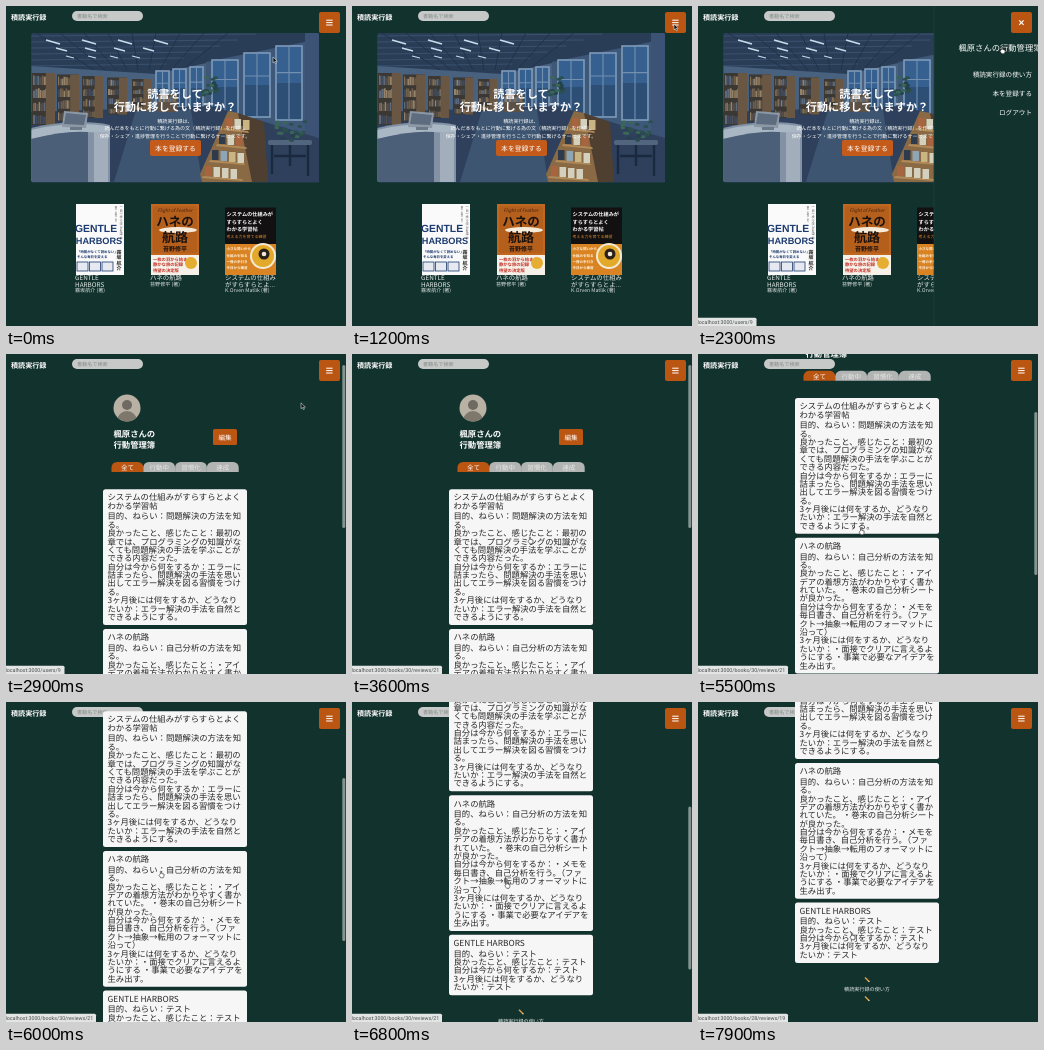
An HTML page for the animation above (8000 ms loop, 340 px wide and 320 px high).

```html
<!DOCTYPE html>
<html lang="ja">
<head>
<meta charset="utf-8">
<style>
  html, body { margin: 0; width: 100%; height: 100%; overflow: hidden; background: #12322d; }
  svg { display: block; font-family: "Noto Sans CJK JP", "Noto Sans CJK", sans-serif; text-rendering: geometricPrecision; }
  .latin { font-family: Roboto, "Open Sans", sans-serif; }
</style>
</head>
<body>
<svg id="stage" width="340" height="320" viewBox="0 0 340 320"></svg>
<script>
const BG = '#12322d', ORANGE = '#bb5512', INK = '#262626', NAVY = '#1d3b70';
const SERVICE = '積読実行録', USER = '楓原さんの';
const BOOKS = [
  { title: 'GENTLE HARBORS', lines: ['GENTLE', 'HARBORS'], by: '霧坂航介' },
  { title: 'ハネの航路', lines: ['ハネの航路'], by: '苔野修平' },
  { lines: ['システムの仕組み', 'がすらすらとよ...'], by: 'K.Orven Matlik' }
];

let seed = 7;
const rnd = () => (seed = seed * 16807 % 2147483647) / 2147483647;
const pick = list => list[Math.floor(rnd() * list.length)];

// y is the middle of the line
const text = (x, y, size, str, fill = '#fff', more = '') =>
  `<text x="${x}" y="${y + size * .38}" font-size="${size}" fill="${fill}" ${more}>${str}</text>`;
const MID = ' text-anchor="middle"', END = ' text-anchor="end"', BOLD = ' font-weight="700"';
const rect = (x, y, w, h, fill, r = 0, more = '') =>
  `<rect x="${x}" y="${y}" width="${w}" height="${h}" rx="${r}" fill="${fill}" ${more}/>`;
const oval = (x, y, rx, ry, fill, more = '') => `<ellipse cx="${x}" cy="${y}" rx="${rx}" ry="${ry}" fill="${fill}" ${more}/>`;
const poly = (points, fill, more = '') => `<polygon points="${points}" fill="${fill}" ${more}/>`;
const line = (d, stroke, w = 1, more = '') => `<path d="${d}" fill="none" stroke="${stroke}" stroke-width="${w}" ${more}/>`;

function bookRow(x, y, w, h, colors) {
  let out = '';
  for (let i = 0; i < w;) {
    const bw = Math.min(w - i, 1 + rnd() * 1.4), bh = h * (.7 + rnd() * .3);
    out += rect(x + i, y + h - bh, bw, bh, pick(colors));
    i += bw + .2;
  }
  return out;
}

function bookcase(x, y, w, h) {
  const spines = ['#6d5d4b', '#857055', '#55504b', '#5d6a7c', '#3f4a5c', '#94836a'];
  let out = rect(x, y, w, h, '#3b3732') + rect(x + w * .6, y, w * .4, h, '#6a5743');
  for (let r = 0; r < 4; r++) out += bookRow(x + 1, y + 2 + r * h / 4, w * .6 - 1, h / 4 - 3, spines);
  return out;
}

function plant(x, y, w, h) {
  let out = '';
  for (let i = 0; i < 22; i++) {
    out += oval(x + (rnd() - .5) * w, y + (rnd() - .5) * h, 2.5, 1.6, pick(['#2b4f4c', '#3a6658', '#23424a']));
  }
  return out;
}

function windowPane(x, y, w, h) {
  let out = rect(x, y, w, h, '#35608f') + rect(x, y + h * .5, w, h * .5, '#2d4f76');
  out += rect(x, y, w, h, 'none', 0, 'stroke="#7f9bba" stroke-width="1.6"');
  return out + line(`M${x + w / 2} ${y}v${h}M${x} ${y + h * .36}h${w}`, '#7390b1', 1.1);
}

function library() {
  let out = rect(25, 27, 289, 150, '#2d425e');
  // ceiling beams and lamps
  out += poly('25,27 313,27 313,34 205,58 150,68 25,62', '#2a3d57');
  for (let i = 0; i < 6; i++) out += line(`M25 ${30 + i * 6}L${250 - i * 18} ${28 + i * 6}`, '#3d5470', .9);
  for (let i = 0; i < 9; i++) out += line(`M${30 + i * 24} 27L${88 + i * 11} 64`, '#203148', .9);
  for (let r = 0; r < 3; r++) for (let i = 0; i < 4; i++) {
    const x = 40 + r * 10 + i * (36 - r * 7), y = 34 + r * 8;
    out += line(`M${x} ${y}l${14 - r * 3} ${4 - r}`, '#c8dcec', 1.7 - r * .3);
  }
  // back wall and windows
  out += poly('25,60 150,68 205,56 205,106 25,106', '#48617f');
  out += poly('200,56 313,33 313,134 200,110', '#3d5879');
  for (let i = 0; i < 3; i++) out += windowPane(150 + i * 17, 65 - i * 2, 13, 34 + i * 4);
  for (let i = 0; i < 3; i++) out += windowPane(206 + i * 32, 54 - i * 7, 26, 54 + i * 10);
  out += rect(299, 27, 14, 130, '#3c5375') + rect(299, 156, 14, 20, '#6c7b91');
  // floor
  out += poly('25,106 205,100 313,132 313,176 25,176', '#2e405b');
  out += poly('130,104 185,104 196,176 108,176', '#496381', 'opacity=".6"');
  // bookcases
  for (let i = 0; i < 5; i++) out += bookcase(26 + i * 25, 67 + i * 1.5, 23 - i, 52 - i * 5);
  out += rect(151, 88, 20, 18, '#5d5044') + bookRow(152, 90, 18, 6, ['#857055', '#5d6a7c', '#94836a']);
  out += plant(205, 80, 14, 18);
  // round counter
  out += `<path d="M25 122Q70 112 104 119V176H25Z" fill="#8292a4"/><path d="M25 124Q70 114 104 121V128Q70 122 25 133Z" fill="#a9b7c4"/>`;
  out += `<path d="M25 133Q60 124 82 126V176H25Z" fill="#4c5f78"/>` + rect(88, 126, 14, 50, '#a2aebb');
  out += poly('58,105 82,107 80,122 56,121', '#8c98a5') + poly('60,107 80,109 78,119 58,118', '#5d6c7e') + rect(64, 121, 12, 3, '#6b7888');
  // chairs and plant at the right
  out += rect(262, 134, 44, 5, '#51657f', 2) + line('M266 139V168M302 139V170M268 150H300M284 139V160', '#1b2940', 2.4);
  out += plant(283, 125, 32, 20);
  // magazine rack
  out += poly('222,105 232,107 262,176 196,176 194,168', '#8a6a45') + poly('232,107 258,116 262,176 246,176', '#4f3f31');
  for (let r = 0; r < 4; r++) {
    const y = 111 + r * 16, x = 218 - r * 7;
    out += poly(`${x},${y + 11} ${x + 24 + r * 5},${y + 14} ${x + 25 + r * 5},${y + 16} ${x - 1},${y + 13}`, '#b08a58');
    for (let i = 0; i < 3 + (r > 1); i++) out += rect(x + 2 + i * 8.5, y + 1 + i, 6.5, 10, pick(['#c9b583', '#8ea5b5', '#a8643f', '#d3d0bd', '#2d3b4c']), .4);
  }
  return `<g clip-path="url(#heroClip)">${out}</g>`;
}

function covers() {
  let a = rect(70, 198, 48, 71, '#fafafa');
  const sans = ' font-family="Liberation Sans, sans-serif"';
  a += text(90, 222, 10.4, 'GENTLE', NAVY, MID + BOLD + sans) + text(93, 235, 9.2, 'HARBORS', NAVY, MID + BOLD + sans);
  [...'一日一歩で学びを深め'].forEach((c, i) => a += text(115, 201 + i * 3.4, 3.2, c, '#444', MID));
  [...'静かに続ける力'].forEach((c, i) => a += text(110, 201 + i * 2.4, 2.3, c, '#444', MID));
  a += text(71, 246, 3.4, '「時間がなくて読めない」', NAVY, BOLD) + text(71, 251, 3.4, 'そんな毎日を変える', NAVY, BOLD);
  for (let i = 0; i < 3; i++) a += rect(71 + i * 12.5, 256, 11, 9, '#e6eaf0', 0, `stroke="${NAVY}" stroke-width=".8"`);
  [...BOOKS[0].by].forEach((c, i) => a += text(113, 246 + i * 5.5, 5, c, INK, MID + BOLD));

  let b = rect(145, 198, 48, 71, '#c0681f') + rect(147, 200, 44, 47, '#a4511a', 2, 'opacity=".4"');
  b += text(169, 204, 4.6, 'Flight of Feather', '#46230f', MID + ' font-style="italic"');
  b += oval(172, 224, 19, 3, '#f6ead8');
  b += text(169, 215, 12.5, 'ハネの', '#1b120d', MID + BOLD) + text(169, 231, 13, '航路', '#1b120d', MID + BOLD);
  b += text(169, 243, 6, BOOKS[1].by, '#1b120d', MID + BOLD);
  b += rect(145, 249, 48, 20, '#f5f1e8');
  ['一枚の羽から始まる', '静かな旅の記録', '待望の決定版'].forEach((s, i) => b += text(147, 253 + i * 5.7, 4.3, s, '#c52d23', BOLD));
  b += oval(185, 257, 6, 6, '#e5ae32');

  let c = rect(219, 201.5, 51, 67.5, '#121010');
  ['システムの仕組みが', 'すらすらとよく', 'わかる学習帖'].forEach((s, i) => c += text(220.5, 208.5 + i * 7.3, 5.2, s, '#fff', BOLD));
  c += text(220.5, 230.5, 4, '考える力を育てる練習', '#d58a35');
  c += rect(219, 238, 51, 31, '#d98322');
  c += oval(257, 250, 13, 13, '#f3ead6') + oval(257, 250, 11, 11, '#e3a92b') + oval(258, 248, 5.5, 5.5, '#2a211a') + oval(258, 248, 2.3, 2.3, '#f3ead6');
  ['小さな問いから', '仕組みを知る', '一冊の手引き', '今日から練習'].forEach((s, i) => c += text(220.5, 243 + i * 6.3, 3.5, s, '#fff4df', BOLD));
  return a + b + c;
}

function homePage() {
  let out = library();
  out += text(169, 88, 11.2, '読書をして', '#fff', MID + BOLD) + text(169, 101, 11.2, '行動に移していますか？', '#fff', MID + BOLD);
  [SERVICE + 'は、', `読んだ本をもとに行動に繋げる為の文（${SERVICE}）を作成し`, '保存・シェア・進捗管理を行うことで行動に繋げるサービスです。']
    .forEach((s, i) => out += text(169, 115 + i * 7.4, 5.05, s, '#fff', MID));
  out += rect(144, 134, 51, 16, '#c45b1b', 2) + text(169.5, 142, 6.8, '本を登録する', '#fff', MID);
  out += covers();
  BOOKS.forEach((book, i) => {
    const x = 69 + i * 75;
    book.lines.forEach((s, k) => out += text(x, 272 + k * 6.6, 6.4, s, '#e9eeec'));
    out += text(x, i === 1 ? 278 : 284, 5.1, book.by + ' (著)', '#dde4e1');
  });
  return out;
}

const LINE = 8.38;
function card(y, h, title, body) {
  let out = rect(97, y, 144, h, '#f6f6f6', 2.5);
  title.forEach((s, i) => out += text(101.5, y + 8 + i * LINE, 8.35, s, INK));
  const top = y + 18.6 + (title.length - 1) * LINE;
  body.forEach((s, i) => out += text(101.5, top + i * LINE, 8.35, s, INK));
  return out;
}

function notesPage() {
  let out = `<g clip-path="url(#faceClip)">${rect(107, 40, 28, 28, '#b8b1a4')}${oval(121, 51, 5, 5, '#6f6a61')}${oval(121, 67, 10, 10, '#7d776c')}</g>`;
  out += text(107.5, 80, 8.35, USER, '#fff', BOLD) + text(107.5, 91, 8.35, '行動管理簿', '#fff', BOLD);
  out += rect(207, 75, 24, 16, ORANGE, 1.5) + text(219, 83, 6.6, '編集', '#fff', MID);
  ['全て', '行動中', '習慣化', '達成'].forEach((s, i) => {
    const x = 105.5 + i * 31.8;
    out += `<path d="M${x} 118v-4.5a5.5 5.5 0 0 1 5.5-5.5h20.8a5.5 5.5 0 0 1 5.5 5.5v4.5z" fill="${i ? '#b1b4b2' : ORANGE}"/>`;
    out += text(x + 15.9, 113.3, 6.5, s, i ? '#e6e8e6' : '#fff', MID);
  });
  out += card(135.3, 135.7, ['システムの仕組みがすらすらとよく', 'わかる学習帖'], [
    '目的、ねらい：問題解決の方法を知', 'る。', '良かったこと、感じたこと：最初の',
    '章では、プログラミングの知識がな', 'くても問題解決の手法を学ぶことが', 'できる内容だった。',
    '自分は今から何をするか：エラーに', '詰まったら、問題解決の手法を思い', '出してエラー解決を図る習慣をつけ', 'る。',
    '3ヶ月後には何をするか、どうなり', 'たいか：エラー解決の手法を自然と', 'できるようにする。']);
  out += card(275, 135.7, [BOOKS[1].title], [
    '目的、ねらい：自己分析の方法を知', 'る。', '良かったこと、感じたこと：・アイ',
    'デアの着想方法がわかりやすく書か', 'れていた。 ・巻末の自己分析シート', 'が良かった。',
    '自分は今から何をするか：・メモを', '毎日書き、自己分析を行う。（ファ', 'クト→抽象→転用のフォーマットに', '沿って）',
    '3ヶ月後には何をするか、どうなり', 'たいか：・面接でクリアに言えるよ', 'うにする ・事業で必要なアイデアを', '生み出す。']);
  out += card(414.5, 60.5, [BOOKS[0].title], [
    '目的、ねらい：テスト', '良かったこと、感じたこと：テスト', '自分は今から何をするか：テスト',
    '3ヶ月後には何をするか、どうなり', 'たいか：テスト']);
  for (const y of [491.5, 510.5]) out += line(`M167 ${y - 2}L171 ${y + 2}`, '#e0a04a', 1.5) + line(`M170.6 ${y + 1.6}L171.4 ${y + 2.4}`, '#f0dcc0', 1.2);
  return out + text(169, 501, 5.1, SERVICE + 'の使い方', '#dfe6e3', MID);
}

function menuPanel() {
  return rect(236, 0, 106, 320, BG) + line('M236 0V320', '#1f3f3a', .8) +
    text(260.5, 42, 8.3, USER + '行動管理簿') +
    text(334, 68, 6.6, SERVICE + 'の使い方', '#fff', END) +
    text(334, 87, 6.6, '本を登録する', '#fff', END) +
    text(334, 106, 6.6, 'ログアウト', '#fff', END);
}

const stage = document.getElementById('stage');
stage.innerHTML = `
  <defs>
    <clipPath id="heroClip">${rect(25.5, 27, 287.5, 149.5, '#fff', 2)}</clipPath>
    <clipPath id="faceClip"><circle cx="121" cy="54" r="13.5"/></clipPath>
  </defs>
  ${rect(0, 0, 340, 320, BG)}
  ${text(5, 11, 7.1, SERVICE, '#fff', BOLD)}
  ${rect(66, 5, 71, 10, '#c6c9c8', 5)}${text(71, 10, 5.1, '書籍名で検索', '#868c8a')}
  <g id="home">${homePage()}</g>
  <g id="notes">${notesPage()}</g>
  <g id="menu">${menuPanel()}</g>
  ${rect(313, 6, 21, 21, ORANGE, 2)}
  ${line('M320.2 14.2h6.4M320.2 16.6h6.4M320.2 19h6.4', '#fff', 1, 'id="bars"')}
  ${line('M321.2 14.4l4.4 4.4M325.6 14.4l-4.4 4.4', '#fff', 1.2, 'id="cross"')}
  ${rect(336.3, 11, 3, 163, '#84948f', 1.5, 'id="thumb"')}
  <g id="status">${rect(-2, 311.7, 60, 10, '#e3e5e5', 1.5, 'id="statusBox"')}
    <text id="url" class="latin" x="-.5" y="317.8" font-size="5.3" fill="#4a4d4d"></text></g>
  <path id="arrow" d="M0 0V5.8L1.4 4.6L2.4 6.8L3.4 6.3L2.4 4.2H4.3Z" fill="#111" stroke="#fff" stroke-width=".5"/>
  <path id="hand" d="M1.4 3V.6a.6.6 0 0 1 1.2 0V2.4L5 3V5L4.2 6.8H1.8L0 4.2L.5 3.6Z" fill="#fff" stroke="#222" stroke-width=".6"/>`;

const el = id => document.getElementById(id);
const show = (id, on) => el(id).style.display = on ? '' : 'none';
const clamp = (v, lo = 0, hi = 1) => Math.min(hi, Math.max(lo, v));
const ease = p => p * p * (3 - 2 * p);
const move = (id, x, y) => el(id).setAttribute('transform', `translate(${x} ${y})`);

// time, x, y
const POINTER = [[0, 267, 51], [400, 267, 51], [1100, 322, 18], [1500, 322, 18], [2200, 302, 41],
  [2800, 302, 41], [3500, 176, 183], [4900, 176, 183], [5900, 153, 169], [6600, 153, 170], [7400, 152, 231], [8000, 152, 231]];

function pointer(t) {
  const i = POINTER.findIndex(k => k[0] > t);
  const [t0, x0, y0] = POINTER[i - 1], [t1, x1, y1] = POINTER[i];
  const p = ease((t - t0) / (t1 - t0));
  return [x0 + (x1 - x0) * p, y0 + (y1 - y0) * p];
}

function statusPath(t) {
  if (t >= 2100 && t < 3100) return 'users/9';
  if (t < 3400) return '';
  return t < 7300 ? 'books/30/reviews/21' : 'books/28/reviews/19';
}

const OPEN = 1400, LOAD = 2700;
function draw(now) {
  const t = Math.floor(now % 8000 / 100) * 100;
  const scroll = clamp((t - 4190) * .0696, 0, 214);
  const loaded = t >= LOAD, menu = t >= OPEN && !loaded;

  show('home', !loaded);
  show('notes', loaded);
  show('menu', menu);
  show('bars', !menu);
  show('cross', menu);
  move('notes', 0, -scroll);
  move('menu', 104 * (1 - ease(clamp((t - OPEN) / 400))), 0);

  show('thumb', loaded);
  move('thumb', 0, scroll * .515);
  el('thumb').style.opacity = clamp((7850 - t) / 250);

  const path = statusPath(t);
  show('status', path);
  el('url').textContent = 'localhost:3000/' + path;
  el('statusBox').setAttribute('width', path.length > 10 ? 92 : 60.5);

  const [x, y] = pointer(t);
  const hand = t >= 2100 && t < LOAD || t >= 3400;
  show('arrow', !hand);
  show('hand', hand);
  move('arrow', x, y);
  move('hand', x, y);
}

let start;
function tick(now) {
  start ??= now;
  draw(now - start);
  requestAnimationFrame(tick);
}
requestAnimationFrame(tick);
</script>
</body>
</html>
```
